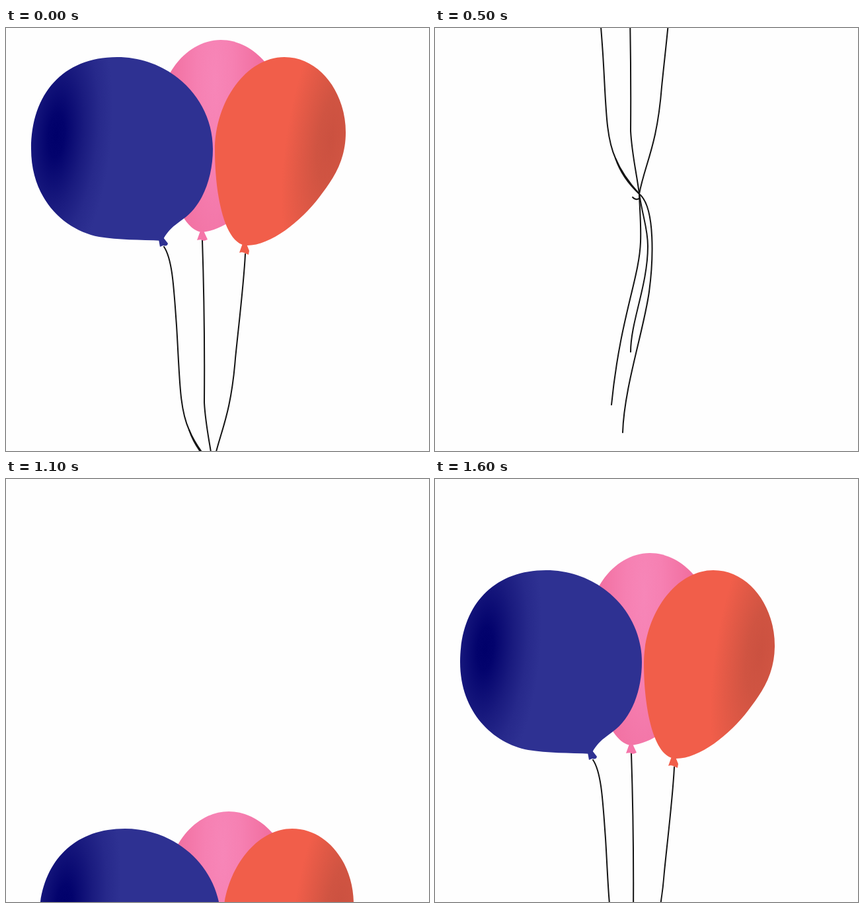
Animation, 640 px wide and 640 px high, one loop 1700 ms. Source, as an HTML page:

```html
<!DOCTYPE html>
<html lang="en">
<head>
<meta charset="utf-8">
<title>Balloons</title>
<style>
  html, body { margin: 0; width: 100%; height: 100%; overflow: hidden; background: #fefefe; }
  svg { display: block; width: 100vw; height: 100vh; }
</style>
</head>
<body>
<svg viewBox="0 0 640 640">
  <defs>
    <radialGradient id="blue" gradientUnits="userSpaceOnUse" cx="0" cy="0" r="1"
      gradientTransform="translate(76 162) rotate(5) scale(84 220)">
      <stop offset="0" stop-color="#00006a"/>
      <stop offset=".15" stop-color="#03036d"/>
      <stop offset=".5" stop-color="#1a1b7f"/>
      <stop offset=".75" stop-color="#27298b"/>
      <stop offset="1" stop-color="#2e3192"/>
    </radialGradient>
    <radialGradient id="pink" gradientUnits="userSpaceOnUse" cx="0" cy="0" r="1"
      gradientTransform="translate(316 80) scale(78 350)">
      <stop offset="0" stop-color="#f786b8"/>
      <stop offset=".35" stop-color="#f680b2"/>
      <stop offset="1" stop-color="#f06c9d"/>
    </radialGradient>
    <radialGradient id="orange" gradientUnits="userSpaceOnUse" cx="0" cy="0" r="1"
      gradientTransform="translate(492 168) rotate(9) scale(68 220)">
      <stop offset="0" stop-color="#cb5140"/>
      <stop offset=".3" stop-color="#d05442"/>
      <stop offset="1" stop-color="#f15e4a"/>
    </radialGradient>
  </defs>
  <g id="bunch">
    <g fill="none" stroke="#141414" stroke-width="2" stroke-linecap="round">
      <path d="M239 331C252 350 254 395 258 450C263 530 262 575 277 608C287 632 302 650 313 662C338 682 334 765 328 810C320 868 290 955 288 1023"/>
      <path d="M277 608C285 632 301 651 313 662"/>
      <path d="M297 321C299 380 301 440 300 567C302 603 309 630 313 662C319 700 326 715 326 741C326 800 300 855 300 901"/>
      <path d="M362 342C360 385 352 450 347 500C340 590 322 615 313 662C314 690 316 710 315 735C313 790 284 850 271 981"/>
      <path d="M303 667Q308 673 314 668"/>
    </g>
    <g fill="#f576a9">
      <path fill="url(#pink)" d="M297 309C255 305 232 190 232 128C232 70 275 18 325 18C376 18 420 70 420 128C420 200 370 300 297 309Z"/>
      <path d="M294 307L289 321Q297 319 298 322Q301 322 305 320L299 307Z"/>
    </g>
    <g fill="#2e3192">
      <path fill="url(#blue)" d="M237 322C200 320 171 321 141 316C88 306 38 259 38 183C38 100 86 44 168 44C248 44 313 106 313 183C313 225 298 268 268 289C254 299 243 308 237 322Z"/>
      <path d="M231 320L233 331L238 329Q244 331 245 326L238 317Z"/>
    </g>
    <g fill="#f15e4a">
      <path fill="url(#orange)" d="M365 329C330 329 316 250 316 185C316 111 364 44 421 44C475 44 514 98 514 158C514 204 492 232 474 256C446 293 400 329 365 329Z"/>
      <path d="M358 326L353 340Q358 338 362 341L367 343L368 337L364 327Z"/>
    </g>
  </g>
</svg>
<script>
  const LOOP = 1700, STEP = 100;
  // time, x, y of the bunch; it leaves at the top and comes back from below
  const keys = [
    [0, 0, 0], [300, -3, -277], [500, -4, -411], [600, -4, -505],
    [700, -4, -640], [800, -4, -810], [899, -4, -1030],
    [900, 12, 624], [1100, 12, 485], [1300, 12, 349], [1600, 0, 94], [1700, 0, 0]
  ];
  const bunch = document.getElementById('bunch');

  function place(t) {
    const i = keys.findIndex(k => k[0] > t);
    const a = keys[i - 1], b = keys[i];
    const p = (t - a[0]) / (b[0] - a[0]);
    return [1, 2].map(n => Math.round(a[n] + (b[n] - a[n]) * p));
  }

  function draw(ms) {
    const t = Math.floor((ms % LOOP) / STEP) * STEP;
    bunch.setAttribute('transform', `translate(${place(t)})`);
  }

  const start = performance.now();
  function tick() {
    draw(performance.now() - start);
    requestAnimationFrame(tick);
  }
  tick();
</script>
</body>
</html>
```
